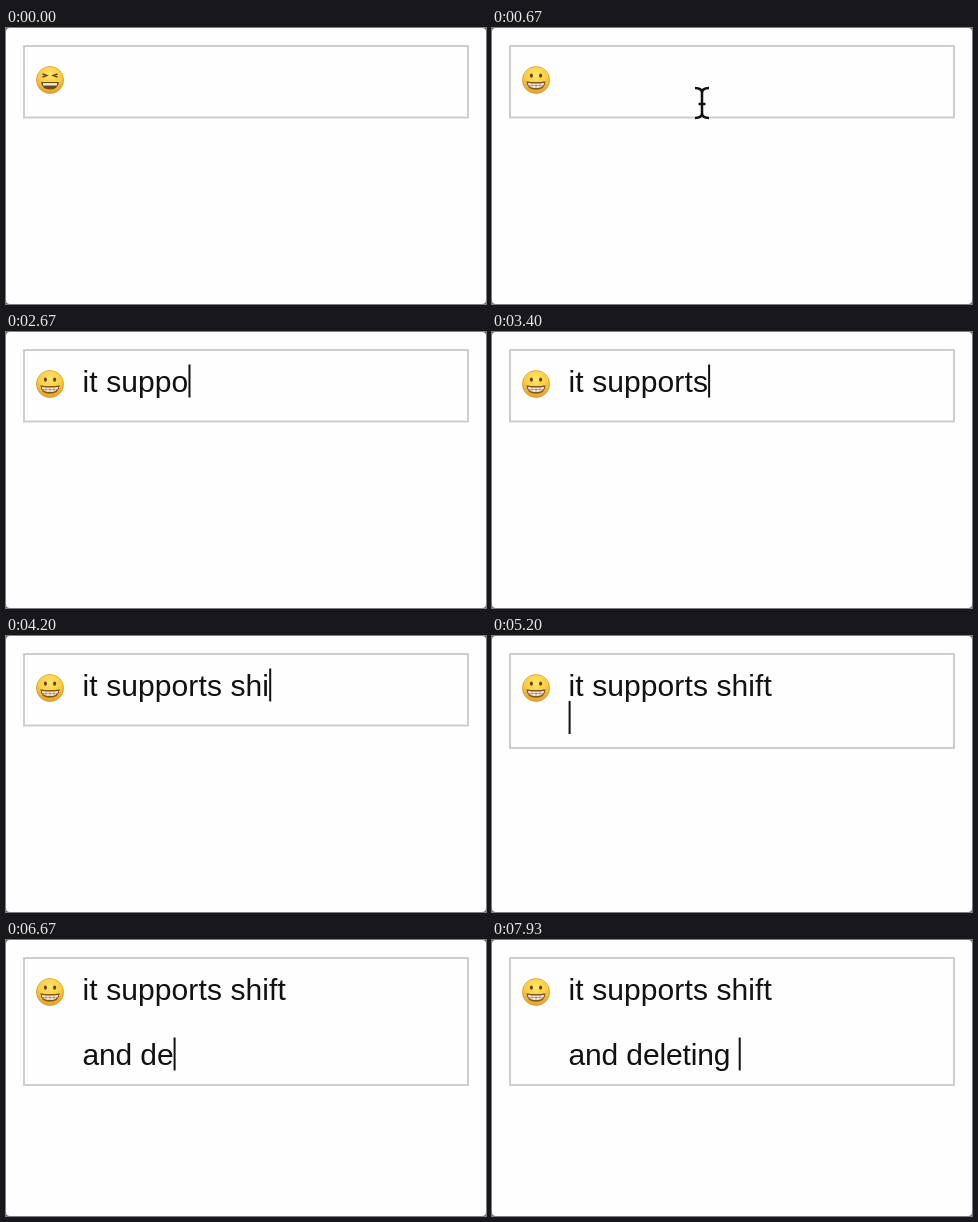
An HTML page for the animation above (8 s loop, 480x276 px).

```html
<!DOCTYPE html>
<html lang="en">
<head>
<meta charset="utf-8">
<title>Typing demo</title>
<style>
  html, body { margin: 0; width: 100%; height: 100%; overflow: hidden; background: #707072; }
  svg { display: block; width: 480px; height: 276px; }
  text { font: 30px "Liberation Sans", Arial, sans-serif; fill: #111; white-space: pre; }
  .halo { fill: none; stroke: #fff; stroke-width: 4.6; }
  .beam { fill: none; stroke: #111; stroke-width: 2.5; }
</style>
</head>
<body>
<svg viewBox="0 0 480 276">
  <defs>
    <radialGradient id="skin" cx=".5" cy=".3" r=".72">
      <stop offset="0" stop-color="#ffe568"/>
      <stop offset=".6" stop-color="#f9ca41"/>
      <stop offset="1" stop-color="#dd9526"/>
    </radialGradient>
    <path id="ibeam" d="M-7-15Q0-15 0-10Q0-15 7-15M0-11V11M-7 15Q0 15 0 10Q0 15 7 15M-3.5 1H3.5"/>
  </defs>

  <rect width="480" height="276" rx="4" fill="#fefdff"/>
  <rect id="field" x="18" y="18" width="444" height="71.5" fill="#fffeff" stroke="#c8c9cd" stroke-width="1.8"/>

  <g transform="translate(44 52)">
    <circle r="13.6" fill="url(#skin)" stroke="#d79a35" stroke-width=".7"/>
    <g id="squint" fill="none" stroke="#5d4218" stroke-width="1.7">
      <path d="M-7.5-6L-3.5-4.5L-7.5-3M7.5-6L3.5-4.5L7.5-3"/>
      <path d="M-9 2H9Q8 9.5 0 9.5T-9 2Z" fill="#6b4a1c" stroke="none"/>
      <path d="M-7 4.3H7" stroke="#f6ecd0" stroke-width="2.4"/>
    </g>
    <g id="grin" fill="#5d4218">
      <ellipse cx="-4.6" cy="-4.4" rx="1.5" ry="2.2"/>
      <ellipse cx="4.6" cy="-4.4" rx="1.5" ry="2.2"/>
      <path d="M-9.6 1.2Q0 3 9.6 1.2Q9 9.8 0 9.8T-9.6 1.2Z" fill="#7b5722"/>
      <path d="M-8.2 3Q0 4.2 8.2 3Q7.6 8 0 8T-8.2 3Z" fill="#f8f0da"/>
      <path d="M-8 5.5H8M-4 3.4V7.8M0 3.6V8M4 3.4V7.8" stroke="#a98a50" stroke-width=".7"/>
    </g>
  </g>

  <text id="line1" x="76.5" y="59.8" letter-spacing=".1" xml:space="preserve"></text>
  <text id="line2" x="76.5" y="124.8" letter-spacing="-.13" xml:space="preserve"></text>
  <rect id="caret" width="2" height="33" fill="#111"/>

  <g id="mouse">
    <path id="arrow" d="M0 0V27L6.2 21.4L10.4 31L15 29L10.8 19.6H19Z" fill="#111" stroke="#fff" stroke-width="1.6"/>
    <g id="bar"><use href="#ibeam" class="halo"/><use href="#ibeam" class="beam"/></g>
  </g>
</svg>
<script>
  const LOOP = 8000;
  const typed = "it supports shift\n\nand deleting ";
  const keyTimes = [
    1730, 1870, 1930, 2130, 2200, 2470, 2530, 2670, 2800, 2930, 3400,
    3470, 3930, 4000, 4200, 4270, 4470, 5070, 5330,
    6070, 6130, 6270, 6330, 6530, 6670, 6800, 6930, 7130, 7330, 7530, 7670, 7870
  ];
  const boxHeights = [71.5, 94, 127];
  // pointer waypoints: time, x, y
  const route = [[70, 225, 158], [280, 219, 98], [470, 210, 75], [670, 210, 75], [1000, 182, 69], [1400, 172, 66]];

  const el = id => document.getElementById(id);
  const set = (node, attrs) => { for (const k in attrs) node.setAttribute(k, attrs[k]); };
  const show = (node, on) => { node.style.display = on ? "" : "none"; };
  const [field, squint, grin, line1, line2, caret, mouse, arrow, bar] =
    ["field", "squint", "grin", "line1", "line2", "caret", "mouse", "arrow", "bar"].map(el);

  function along(t) {
    let i = 0;
    while (i < route.length - 2 && t > route[i + 1][0]) i++;
    const [t0, x0, y0] = route[i], [t1, x1, y1] = route[i + 1];
    const k = Math.min(1, Math.max(0, (t - t0) / (t1 - t0)));
    const e = k * k * (3 - 2 * k);
    return [x0 + (x1 - x0) * e, y0 + (y1 - y0) * e];
  }

  function drawText(t) {
    const lines = typed.slice(0, keyTimes.filter(k => k <= t).length).split("\n");
    const row = lines.length - 1;
    line1.textContent = lines[0];
    line2.textContent = lines[2] || "";
    const width = lines[row] ? (row ? line2 : line1).getComputedTextLength() : 0;
    set(field, { height: boxHeights[row] });
    set(caret, { x: 76.6 + width, y: 32.5 + row * 32.5 });
    show(caret, (t >= 1130 && t < 1670) || (t >= 1730 && t < 5870) || t >= 6070);
  }

  function drawMouse(t) {
    const [x, y] = along(t);
    const inside = y < 90;
    set(mouse, { transform: `translate(${x} ${y})` });
    show(mouse, t >= 70 && t < 1730);
    show(arrow, !inside);
    show(bar, inside);
  }

  const start = performance.now();
  function frame() {
    const t = (performance.now() - start) % LOOP;
    show(squint, t < 200);
    show(grin, t >= 200);
    drawText(t);
    drawMouse(t);
    requestAnimationFrame(frame);
  }
  frame();
</script>
</body>
</html>
```
